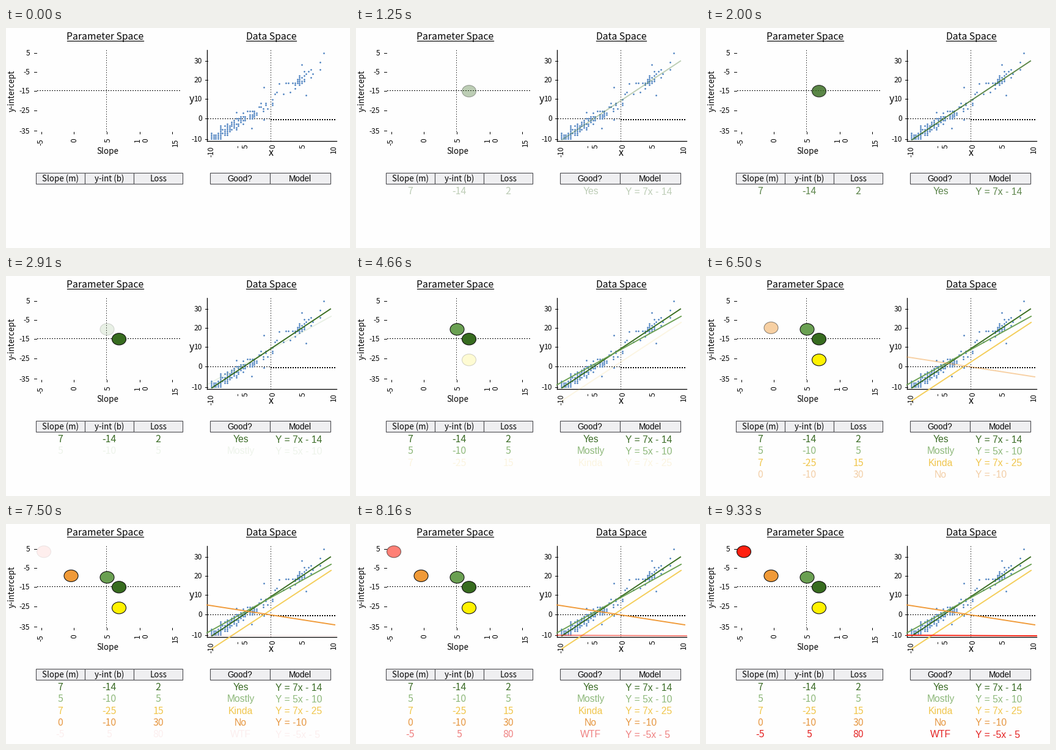
A matplotlib script for the animation above (9410 ms loop, 563 by 360 pixels).

```python
import numpy as np
import matplotlib.pyplot as plt
from matplotlib.animation import FuncAnimation
from matplotlib.patches import Ellipse, Rectangle

W, H, DPI = 563, 360, 64
LOOP_MS, FRAMES = 9410, 113
STEP = LOOP_MS / FRAMES
PT = 72 / DPI  # points per pixel

HUMANIST, GROTESK = "Noto Sans CJK JP", "Liberation Sans"
INK = "#050505"

fig = plt.figure(figsize=(W / DPI, H / DPI), dpi=DPI, facecolor="#fefefe")
ax = fig.add_axes([0, 0, 1, 1])
ax.set_xlim(0, W)
ax.set_ylim(H, 0)
ax.axis("off")


def text(x, y, s, px, font=HUMANIST, color=INK, ha="center", **kw):
    return ax.text(x, y, s, fontsize=px * PT, family=font, color=color,
                   ha=ha, va="baseline", **kw)


def upright(x, y, s, px):
    """Text reading upwards, baseline at x, centred on y."""
    text(x, y, s, px, rotation=90, rotation_mode="anchor")


def line(x0, y0, x1, y1, color=INK, width=1.0, **kw):
    return ax.plot([x0, x1], [y0, y1], color=color, lw=width * PT, **kw)[0]


def dotted(x0, y0, x1, y1, color=INK, width=1.0):
    line(x0, y0, x1, y1, color, width, linestyle=(0, (1, 2 / width)),
         antialiased=False)


def title(x, s, half):
    text(x, 19, s, 15.7)
    line(x - half, 20.7, x + half, 20.7, width=1.2)


def header(x, cell, labels, font, px):
    for k, label in enumerate(labels):
        left = x + k * cell
        ax.add_patch(Rectangle((left, 237), cell, 18, fc="#efeff1",
                               ec="#4c4c50", lw=1.1 * PT))
        text(left + cell / 2, 250.6, label, px, font)


def y_ticks(right, mark, top, values):
    for k, v in enumerate(values):
        y = top + 29.8 * k + 0.5 * k * k
        text(right, y + 4.2, v, 12, ha="right")
        line(mark, y, mark + 4, y)


def x_ticks(x, gap, y, drop, labels):
    """Upright labels; a space marks one wrapped onto two lines."""
    for k, label in enumerate(labels):
        parts = label.split()
        for j, part in enumerate(parts):
            shift = 13 * (j - (len(parts) - 1) / 2)
            upright(x + k * gap + shift, y + drop * len(part), part, 12)


def parameter_panel():
    title(162.5, "Parameter Space", 62.5)
    dotted(164, 36, 164, 172, "#555555")
    dotted(51, 102, 286, 102)
    y_ticks(39, 46, 41.2, range(5, -36, -10))
    x_ticks(60, 55.3, 181, 3, ("-5", "0", "5", "1 0", "15"))
    for k in range(5):
        line(57.5 + 53.7 * k, 170, 57.5 + 53.7 * k, 173)
    text(166.5, 206, "Slope", 13.4)
    upright(13.7, 102.5, "y-intercept", 13.3)
    header(49.3, 80, ("Slope (m)", "y-int (b)", "Loss"), HUMANIST, 13.3)


def scatter_points():
    """Gridded cloud along the trend: dense low end, small cluster on top."""
    rng = np.random.default_rng(7)
    x, y = np.meshgrid(np.arange(336, 528, 3.7), np.arange(41, 184, 3.05))
    off = y - (183 - 0.665 * (x - 337))
    fill = (0.75 / (1 + np.exp((x - 412) / 14))
            + 0.42 * np.exp(-((x - 483) / 13) ** 2) + 0.1)
    keep = rng.random(x.shape) < fill * np.exp(-(off / 10) ** 4)
    strays = np.array([(422, 97), (447, 91), (377, 138), (402, 164),
                       (422, 150), (491, 110), (484, 60), (520, 41)])
    return (np.append(x[keep], strays[:, 0]),
            np.append(y[keep], strays[:, 1]))


def data_panel():
    title(434, "Data Space", 41)
    dotted(433, 36, 433, 185, "#555555")
    dotted(330, 148, 433, 148)
    dotted(433, 150, 541, 150, width=1.5)
    line(329, 36, 329, 185, width=1.3)
    line(328.5, 185, 540.5, 185, width=1.3)
    y_ticks(321, 325.5, 54.3, range(30, -11, -10))
    x_ticks(339.5, 50.2, 190, 4, ("-10", "- 5", "0", "5", "10"))
    text(304, 121, "y", 16)
    text(434, 209, "x", 16)
    ax.plot(*scatter_points(), "o", ms=2.7 * PT, color="#4a7fbf", mew=0)
    header(333.5, 98.7, ("Good?", "Model"), GROTESK, 13.5)


def model(row, values, verdict, formula, ink, dot, spot, start, end,
          stroke=None):
    """One candidate model: table row, parameter dot and fitted line."""
    base = 272.3 + 19.15 * row
    parts = [text(89 + 80 * k, base, v, 16, color=ink)
             for k, v in enumerate(values)]
    parts.append(text(384, base, verdict, 15.7, GROTESK, ink))
    parts.append(text(441, base + 0.7, formula, 15.8, GROTESK, ink, "left"))
    parts.append(ax.add_patch(Ellipse(spot, 23, 19.2, fc=dot, ec="#111111",
                                      lw=1.1 * PT, zorder=4)))
    parts.append(line(*start, *end, stroke or dot, 1.9, zorder=4))
    return parts


parameter_panel()
data_panel()

models = [
    model(0, (7, -14, 2), "Yes", "Y = 7x - 14", "#3a6b25", "#376c1f",
          (185, 103.3), (337, 183), (531, 54)),
    model(1, (5, -10, 5), "Mostly", "Y = 5x - 10", "#8db87a", "#6aa052",
          (165.5, 87.3), (329, 178), (532, 66)),
    model(2, (7, -25, 15), "Kinda", "Y = 7x - 25", "#f0c64c", "#fff200",
          (185, 137.3), (337, 204), (532, 76), stroke="#f4cd58"),
    model(3, (0, -10, 30), "No", "Y = -10", "#e6963f", "#f09a38",
          (106.5, 84.8), (329, 132.5), (538, 165)),
    model(4, (-5, 5, 80), "WTF", "Y = -5x - 5", "#e42222", "#ff2010",
          (62, 45.3), (329, 182), (541, 183)),
]
CUES = (580, 2500, 4250, 5830, 7330, 8910)
HOLD = 80  # pause before the next model begins to appear


def ease(u):
    """Halfway between linear and a cosine ease."""
    u = min(max(u, 0.0), 1.0)
    return 0.5 * u + 0.25 * (1 - np.cos(np.pi * u))


def draw(i):
    t = i * STEP
    for parts, start, following in zip(models, CUES, CUES[1:]):
        alpha = ease((t - start) / (following - HOLD - start))
        for part in parts:
            part.set_alpha(alpha)
            part.set_visible(alpha > 0)
    return sum(models, [])


anim = FuncAnimation(fig, draw, frames=FRAMES, interval=STEP,
                     init_func=lambda: draw(0), repeat=True, repeat_delay=0)
plt.show()
```
